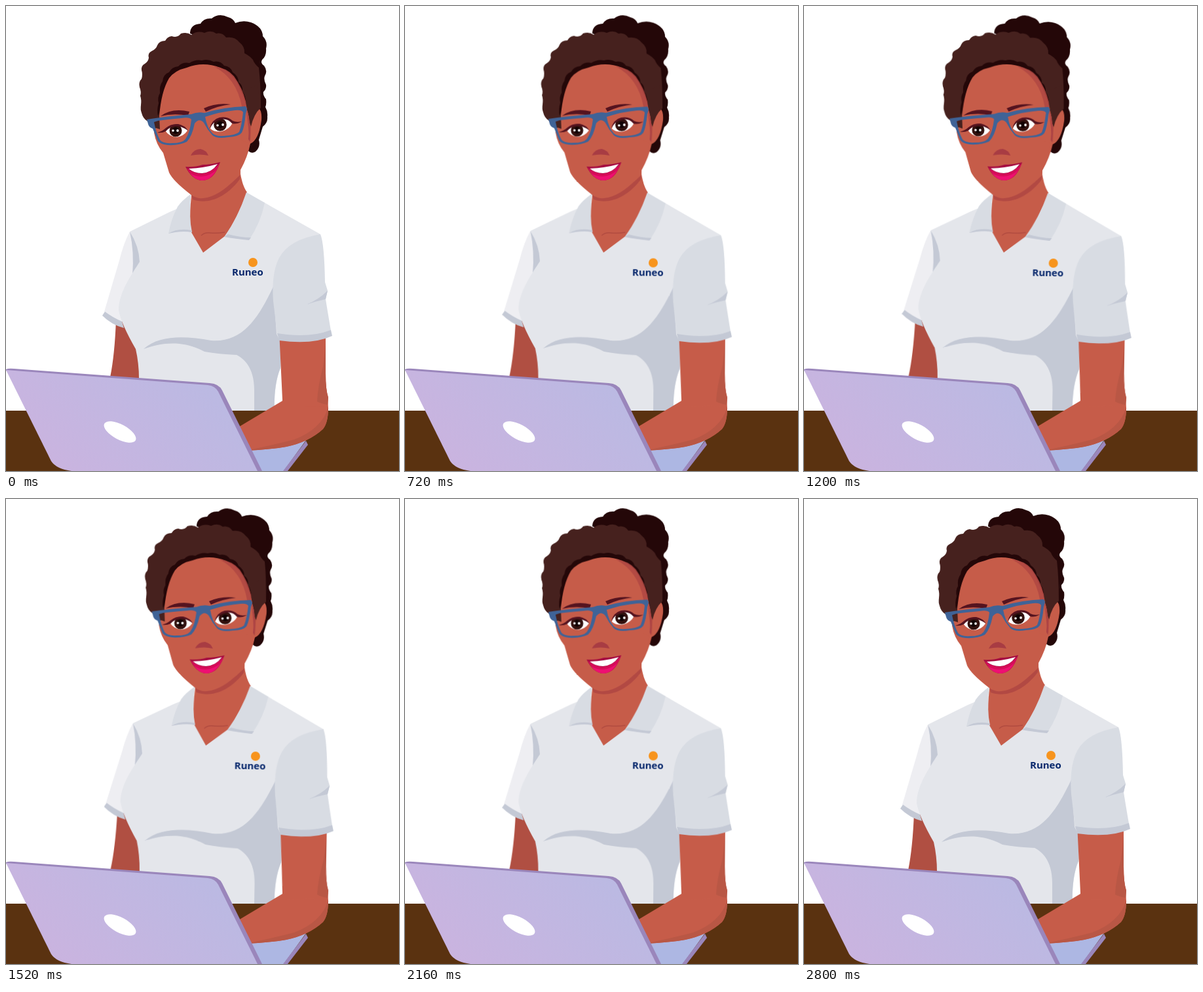
These frames come from a looping animation (600 by 709 pixels, 2.88 s). An HTML page:

```html
<!DOCTYPE html>
<html lang="en">
<head>
<meta charset="utf-8">
<title>Woman at a laptop</title>
<style>
  html, body { margin: 0; width: 100%; height: 100%; overflow: hidden; background: #fff; }
  svg { display: block; width: 100vw; height: 100vh; }
  .body { transform-origin: 310px 617px; }
  .arm-left { transform-origin: 180px 590px; }
  .arm-right { transform-origin: 470px 604px; }
  .skin { fill: #c65c49; }
  .skin-dim { fill: #b04f42; }
  .skin-shade { fill: #b95745; }
  .blush { fill: #b24943; }
  .hair { fill: #46211e; }
  .hair-dark { fill: #240708; }
  .shirt { fill: #e4e6eb; }
  .cloth { fill: #d8dce3; }
  .fold { fill: #c4c9d5; }
  .brow { fill: #55131f; }
  .frame { fill: #3f6397; }
  .edge { fill: #9a86bb; }
  .badge { font: bold 15px "Open Sans", sans-serif; fill: #06266b; }
</style>
</head>
<body>
<svg viewBox="0 0 600 709" preserveAspectRatio="none">
  <defs>
    <linearGradient id="lid" x1="0" y1=".7" x2="1" y2=".3">
      <stop offset="0" stop-color="#cbb3df"/>
      <stop offset="1" stop-color="#b9bae3"/>
    </linearGradient>
  </defs>

  <g class="arm-left">
    <path class="skin-dim" d="M168 478H190L210 530V580H157L159 566Q166 532 168 478Z"/>
  </g>

  <g class="body">
    <!-- shirt -->
    <path fill="#eeeef2" d="M189 344Q180 360 173 388L150 466Q163 476 177 482L190 450L206 400Z"/>
    <path class="fold" d="M151 466Q163 475 177 481L180 491Q161 486 147 472Z"/>
    <path class="fold" d="M189 344Q206 365 204 392L193 410Q196 375 189 344Z"/>
    <path class="shirt" d="M283 300L250 314L189 344Q203 366 204 390C193 408 172 436 172 464Q176 485 198 523Q203 545 203 568L205 625H410Q408 580 419 552L450 440L480 348L395 300L367 286Z"/>
    <path class="fold" d="M210 523C234 501 274 503 313 510C362 514 386 474 408 428L413 500L419 512V552Q408 578 410 625H379V585C379 550 362 537 352 532Q325 531 303 527C272 510 240 512 210 523Z"/>

    <!-- neck and collar -->
    <path class="skin" d="M284 280Q279 322 283 345L301 376L334 351Q352 326 368 284Q360 273 357 250Z"/>
    <path class="blush" d="M283 286L290 290Q325 287 358 257L357 264C338 290 310 304 285 295Z"/>
    <path d="M298 350Q303 345 312 346T334 345" fill="none" stroke="#b14b40" stroke-width="1.5"/>
    <path class="cloth" d="M283 286Q268 297 262 306Q252 325 248 347Q268 341 284 345Q278 318 283 286Z"/>
    <path class="fold" d="M248 347Q262 338 283 342L284 345Q268 342 248 347Z"/>
    <path class="cloth" d="M367 284L395 300Q389 330 371 357L334 351Q354 323 367 284Z"/>
    <path class="fold" d="M333 352L339 348Q358 353 374 353L371 357Q350 355 333 352Z"/>

    <!-- hair -->
    <path class="hair-dark" d="M281 42Q281 28 297 27Q302 18 314 19Q325 10 339 17Q347 19 350 26Q362 21 374 25Q392 32 392 46Q400 54 397 65Q398 76 391 82Q388 87 394 91Q400 99 395 107Q393 112 397 120Q398 126 393 131Q392 136 397 142Q398 149 396 154Q400 161 399 169Q400 178 392 184L386 204Q389 215 381 222Q375 226 370 221L372 150L330 60Z"/>
    <path class="hair" d="M283 44Q276 39 267 42Q262 49 253 46Q246 47 243 53Q234 53 231 60Q229 66 222 69Q216 72 218 79Q217 85 212 88Q206 91 207 98Q209 104 207 111Q202 116 204 124Q207 131 205 137Q207 143 206 151Q205 158 207 163Q209 171 215 175L232 190L236 188L240 130L300 95L345 110L374 186Q378 165 389 155Q389 120 386 94Q379 88 377 82Q372 76 364 72Q365 62 356 55Q349 46 336 48Q330 40 321 42Q313 36 303 41Q292 37 283 44Z"/>
    <path class="hair-dark" d="M232 168Q230 158 233 148Q231 139 235 133Q234 121 239 115Q240 104 249 101Q253 93 263 92Q270 85 280 87Q289 81 299 83Q308 80 317 85Q327 83 333 91Q343 92 346 101Q355 107 355 116Q362 121 361 130Q367 137 366 148L345 130L300 100L250 120Z"/>

    <!-- face -->
    <path class="skin" d="M234 168Q237 130 249 110Q258 98 276 94Q301 84 327 94Q348 103 357 126Q369 150 373 184Q378 164 386 156Q391 160 390 174Q386 204 373 210Q369 230 358 250V257C342 272 324 291 301 293Q292 294 284 289Q255 267 249 254L240 224Q229 211 226 193L229 186L235 188Z"/>
    <path class="blush" d="M317 92Q337 94 348 107Q361 125 366 145Q368 170 374 184L373 209Q364 172 360 153Q352 110 317 92Z" opacity=".9"/>
    <path class="skin" d="M358 160L366 157Q370 184 373 210L360 205Z"/>
    <path d="M368 157Q374 180 372 207L370 203Q372 184 368 157Z" fill="#aa4145"/>
    <path class="hair" d="M362 130Q368 143 368 158Q373 171 374 184Q378 165 389 155L384 120Z"/>

    <!-- eyes -->
    <path class="brow" d="M236 168Q253 155 280 161L278 167Q255 163 236 168ZM302 156Q321 147 343 150Q324 152 305 161Z"/>
    <path fill="#fff" d="M243 190Q249 181 261 181Q273 182 277 190Q271 199 260 200Q249 199 243 190Z"/>
    <path fill="#fff" d="M312 187Q316 173 328 171Q340 170 346 178Q341 188 330 191Q319 193 312 187Z"/>
    <g fill="#32110e">
      <circle cx="259" cy="190" r="9.5"/><circle cx="327" cy="181" r="9.8"/>
    </g>
    <g fill="#110304">
      <circle cx="259" cy="190" r="5"/><circle cx="327" cy="181" r="5"/>
    </g>
    <g fill="#fff">
      <circle cx="255" cy="190" r="1.8"/><circle cx="262" cy="190" r="1.9"/>
      <circle cx="323" cy="182" r="1.8"/><circle cx="331" cy="181" r="1.9"/>
    </g>
    <path class="brow" d="M231 193Q239 191 244 186Q252 179 263 180Q273 182 278 190Q268 183 259 183Q250 184 244 191Q238 194 231 193ZM311 187Q314 173 326 170Q338 168 346 175Q352 178 360 176Q352 181 345 179Q338 171 328 173Q317 175 311 187Z"/>

    <!-- glasses -->
    <path class="frame" fill-rule="evenodd" d="M215 173Q247 168 283 165Q292 161 303 163Q333 154 366 153L368 157L366 164Q364 185 360 193Q356 199 339 200Q322 203 315 197Q307 188 302 178Q295 170 288 179Q284 199 276 207Q264 213 247 212Q236 211 232 206L224 187Q218 185 217 180ZM226 177Q229 193 235 204Q239 210 254 209Q269 209 274 203Q281 193 283 173Q280 169 268 171Q246 173 232 175ZM304 169Q307 186 315 194Q320 199 333 198Q351 197 356 192Q360 182 362 162Q360 158 350 159Q328 161 304 169Z"/>

    <!-- nose and mouth -->
    <path d="M282 228Q287 218 297 218Q306 220 309 228Q296 225 282 228Z" fill="#a83c43"/>
    <path d="M274 245Q288 246 300 242Q312 242 327 238C321 256 310 266 299 266Q284 265 274 245Z" fill="#a50c40"/>
    <path d="M276 247Q286 255 299 256Q314 254 326 240Q318 266 299 266Q284 264 276 247Z" fill="#d50c58"/>
    <path d="M281 255Q288 260 299 260Q312 259 321 250Q312 266 299 266Q288 265 281 255Z" fill="#ee0f72"/>
    <path d="M279 248Q302 247 323 241Q314 254 299 255Q287 255 279 248Z" fill="#fff"/>

    <circle cx="377" cy="391" r="7" fill="#f7941d"/>
    <text class="badge" x="345" y="411">Runeo</text>
  </g>

  <path fill="#5a3210" d="M0 617H600V709H0Z"/>

  <!-- laptop base and right arm -->
  <path fill="#adb7e3" d="M360 672L458 662L424 709H380Z"/>
  <path class="edge" d="M458 663L461 669L430 709H423Z"/>
  <path class="skin" d="M422 590V602L350 645L366 678Q405 676 428 672Q462 665 484 645Q492 635 492 613L491 598Z"/>
  <path class="skin-shade" d="M366 678Q405 676 428 672Q462 665 484 645Q492 635 492 612Q482 645 440 661Q405 670 366 678Z"/>
  <g class="arm-right">
    <path class="skin" d="M417 495L422 600V612L491 610L492 597Q488 585 488 560V495Z"/>
    <path class="skin-shade" d="M488 515V560Q488 585 492 597L491 608Q480 606 475 603Q476 580 484 550Z"/>
  </g>

  <g class="body">
    <path class="cloth" d="M480 348Q486 362 487 421L491 434L488 447Q491 466 496 495Q458 509 414 500L408 450Q405 407 417 384Q432 356 480 348Z"/>
    <path class="fold" d="M491 434L488 447Q474 450 459 455Q477 448 491 434Z"/>
    <path class="fold" d="M414 499Q463 507 496 494L498 503Q468 517 417 510Z"/>
  </g>

  <!-- laptop lid -->
  <path class="edge" d="M0 554Q4 552 12 553L311 575Q325 576 330 586L391 709H370L0 556Z"/>
  <path fill="url(#lid)" d="M0 555L308 578Q319 579 324 588L384 709H100Q77 706 69 694Z"/>
  <ellipse cx="174" cy="649.5" rx="27" ry="11.5" transform="rotate(28 174 649.5)" fill="#fff"/>
</svg>
<script>
  const LOOP = 2880, STEPS = 36, LEAN = 1;

  // Cosine sway, held for 80 ms per step.
  const frames = Array.from({ length: STEPS + 1 }, (_, i) => {
    const angle = LEAN * (1 - Math.cos(2 * Math.PI * i / STEPS)) / 2;
    return { transform: `rotate(${angle.toFixed(4)}deg)`, easing: 'step-end' };
  });

  document.querySelectorAll('.body, .arm-left, .arm-right').forEach(part =>
    part.animate(frames, { duration: LOOP, iterations: Infinity }));
</script>
</body>
</html>
```
